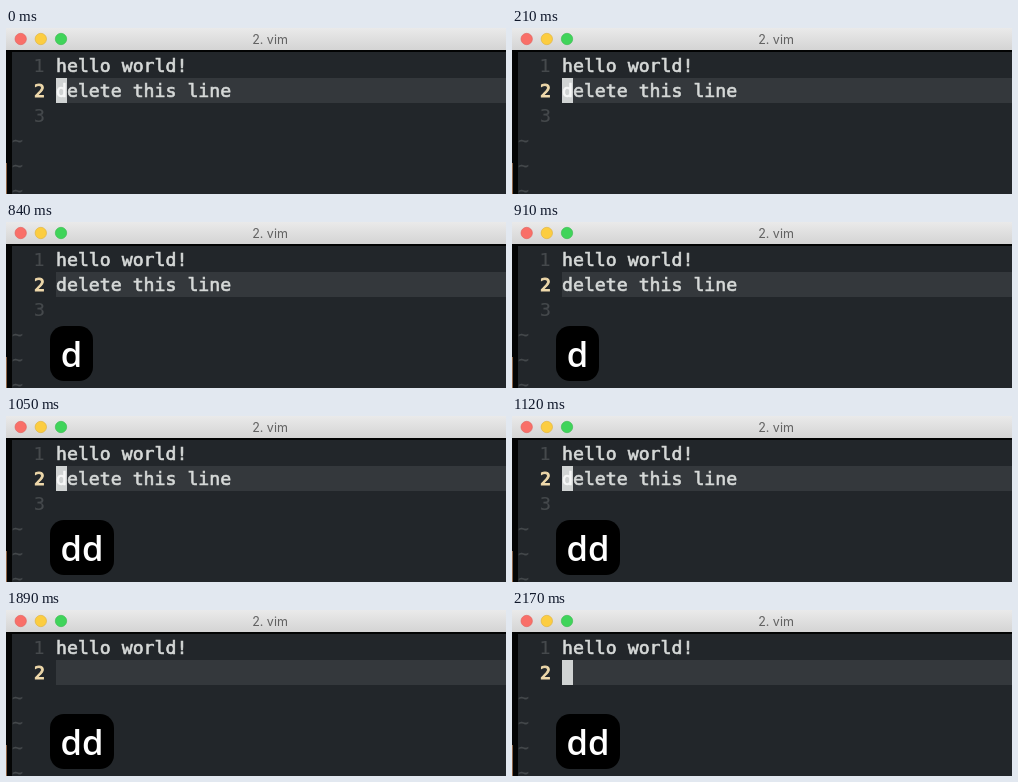
An HTML page that plays this animation: 500 px wide and 166 px high, repeating every 2380 ms.

```html
<!DOCTYPE html>
<html lang="en">
<head>
<meta charset="utf-8">
<title>Deleting a line</title>
<style>
  html, body { margin: 0; width: 100%; height: 100%; overflow: hidden; background: #22262a; }
  svg { display: block; width: 100%; height: 100%; }
  text { white-space: pre; }
  .code { font: 18.2px "DejaVu Sans Mono", monospace; fill: #d6d9d8; stroke: #d6d9d8; stroke-width: .65px; }
  .code .dim { fill: #45494c; stroke: #45494c; stroke-width: .2px; }
  .code .current { fill: #efd9ab; stroke: #efd9ab; stroke-width: 1px; }
  .code .covered { fill: #f6f7f7; stroke: #f6f7f7; }
  .title { font: 12.5px Inter, sans-serif; fill: #626262; text-anchor: middle; }
  .keys { font: 600 34.5px "Open Sans", sans-serif; fill: #fff; text-anchor: middle; }
</style>
</head>
<body>
<svg viewBox="0 0 500 166">
  <defs>
    <linearGradient id="bar" x2="0" y2="1">
      <stop stop-color="#eaeaea"/><stop offset="1" stop-color="#d4d4d4"/>
    </linearGradient>
  </defs>
  <rect width="500" height="166" fill="#22262a"/>
  <rect y="22" width="6" height="144" fill="#040505"/>
  <rect y="135" width="1" height="31" fill="#8c6446"/>
  <rect width="500" height="22" fill="url(#bar)"/>
  <rect y="22" width="500" height="2" fill="#020303"/>
  <g stroke-width=".6">
    <circle cx="14.7" cy="11" r="5.7" fill="#f96f68" stroke="#e05f59"/>
    <circle cx="34.8" cy="11" r="5.7" fill="#fccd40" stroke="#deb03a"/>
    <circle cx="55" cy="11" r="5.7" fill="#40d45a" stroke="#36b94c"/>
  </g>
  <text class="title" x="264" y="15.5">2. vim</text>

  <rect x="50" y="50" width="450" height="25" fill="#34383c"/>
  <g class="code">
    <text class="dim" x="27.6" y="44">1</text>
    <text x="50" y="44">hello world!</text>
    <text class="current" x="28" y="69">2</text>
    <text id="line" x="50" y="69">delete this line</text>
    <text id="third" class="dim" y="94"></text>
    <text class="dim" x="6" y="119">~</text>
    <text class="dim" x="6" y="144">~</text>
    <text class="dim" x="6" y="169">~</text>
    <g id="cursor">
      <rect x="50" y="50" width="11" height="25" fill="#d0d3d3" stroke="none"/>
      <text id="covered" class="covered" x="50" y="69">d</text>
    </g>
  </g>
  <g id="popup">
    <rect id="box" x="44" y="104" height="55" rx="14"/>
    <text id="keys" class="keys" y="145"></text>
  </g>
</svg>
<script>
  const LOOP = 2380;
  const FIRST_KEY = 770, SECOND_KEY = 980, DELETED = 1330;
  const BLINKS = [490, 1050, 1610, 2100];
  const $ = id => document.getElementById(id);
  const show = (id, visible) => $(id).setAttribute("visibility", visible ? "visible" : "hidden");

  function draw(time) {
    const deleted = time >= DELETED;
    const cursorOn = BLINKS.filter(t => time >= t).length % 2 === 0;
    show("line", !deleted);
    show("cursor", cursorOn);
    show("covered", cursorOn && !deleted);
    $("third").textContent = deleted ? "~" : "3";
    $("third").setAttribute("x", deleted ? 6 : 28);

    const keys = time >= SECOND_KEY ? "dd" : "d";
    const width = 22 + 21 * keys.length;
    show("popup", time >= FIRST_KEY);
    $("box").setAttribute("width", width);
    $("keys").setAttribute("x", 44 + width / 2);
    $("keys").textContent = keys;
  }

  const start = performance.now();
  function tick() {
    draw((performance.now() - start) % LOOP);
    requestAnimationFrame(tick);
  }
  tick();
</script>
</body>
</html>
```
